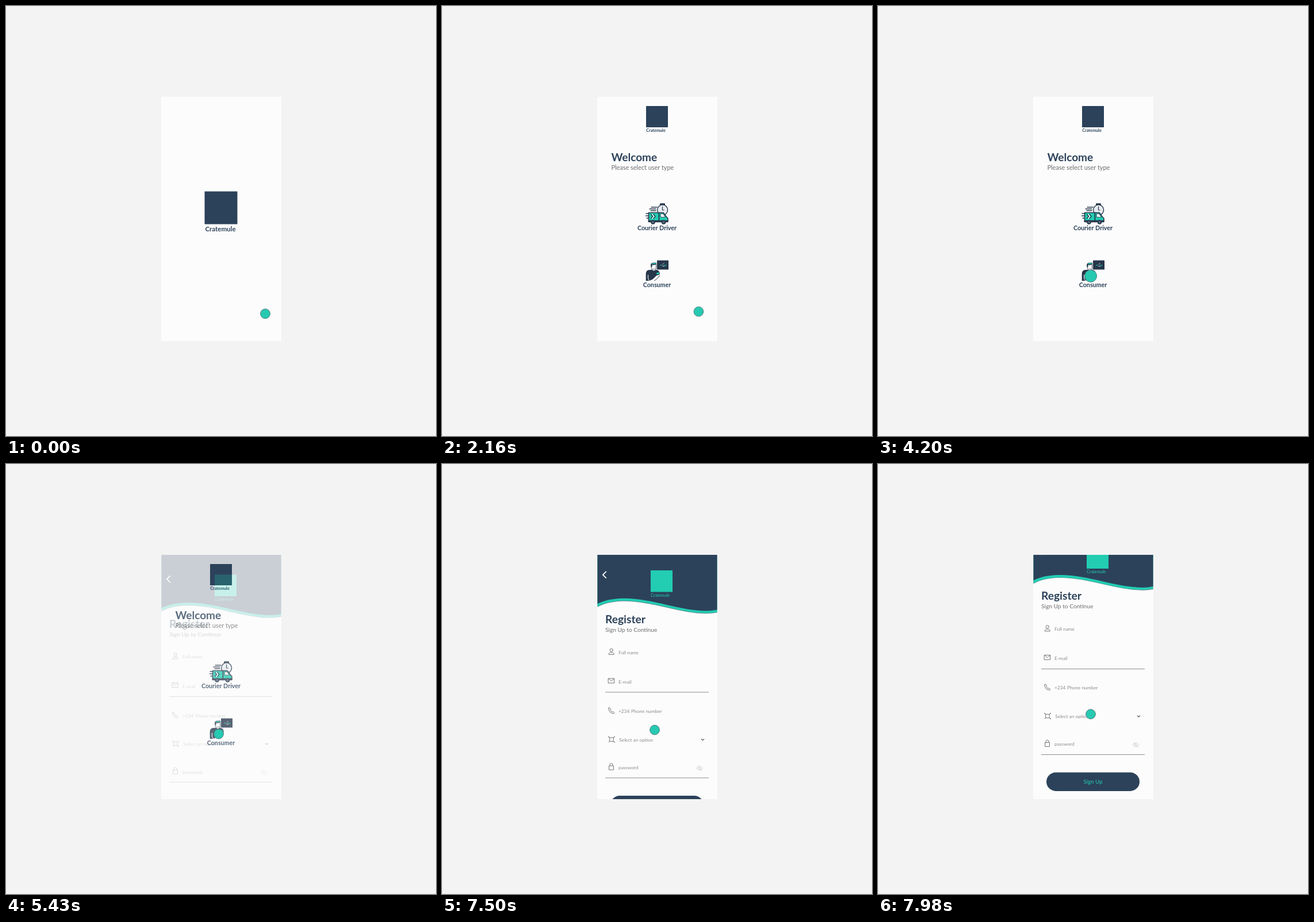
An HTML page with a canvas that plays this animation: 748 px wide and 748 px high, repeating every 8 s.

```html
<!DOCTYPE html>
<html lang="en">
<head>
<meta charset="utf-8">
<title>App sign-up flow</title>
<style>
  html, body { margin: 0; width: 100%; height: 100%; overflow: hidden; background: #f3f3f3; }
  canvas { display: block; }
</style>
</head>
<body>
<canvas id="stage" width="748" height="748"></canvas>
<script>
const SIZE = 748, LOOP = 8000;
const NAVY = '#2c425a', TEAL = '#22cdb2', PAPER = '#fcfcfc', GRAY = '#777', BRAND = 'Cratemule';
const INK = '#27364a';
const stage = document.getElementById('stage').getContext('2d');
const buffer = document.createElement('canvas');
buffer.width = buffer.height = SIZE;
const bufferCtx = buffer.getContext('2d');

const ease = x => x < 0.5 ? 2 * x * x : 1 - 2 * (1 - x) * (1 - x);
const tween = (t, start, end) => ease(Math.min(1, Math.max(0, (t - start) / (end - start))));
const mix = (a, b, p) => a + (b - a) * p;

function text(g, str, x, y, size, color, weight = 400, align = 'left') {
  g.font = `${weight} ${size}px Lato, sans-serif`;
  g.fillStyle = color;
  g.textAlign = align;
  g.fillText(str, x, y);
}

function rect(g, x, y, w, h, color, r = 0) {
  g.fillStyle = color;
  g.beginPath();
  g.roundRect(x, y, w, h, r);
  g.fill();
}

// Fill and/or stroke an SVG path.
function shape(g, d, fill, stroke, width = 1) {
  const path = new Path2D(d);
  if (fill) { g.fillStyle = fill; g.fill(path); }
  if (stroke) {
    g.strokeStyle = stroke;
    g.lineWidth = width;
    g.lineCap = g.lineJoin = 'round';
    g.stroke(path);
  }
}

function circle(g, x, y, r, fill, stroke, width = 1) {
  g.beginPath();
  g.arc(x, y, r, 0, Math.PI * 2);
  if (fill) { g.fillStyle = fill; g.fill(); }
  if (stroke) { g.strokeStyle = stroke; g.lineWidth = width; g.stroke(); }
}

function paper(g) {
  rect(g, 270, 158, 209, 425, PAPER);
}

function splash(g) {
  paper(g);
  rect(g, 345.5, 322.5, 57, 57, NAVY);
  text(g, BRAND, 373, 392, 11.5, NAVY, 700, 'center');
}

function courierIcon(g) {
  shape(g, 'M364 350H374M361 353H372M363 356H372M355 361H359M354.5 365H359M356 369H359', null, INK, 1.3);
  rect(g, 379, 343.3, 9, 3.2, INK, 1);
  circle(g, 383.6, 354.8, 9, '#e8ecf1', INK, 1.4);
  shape(g, 'M383.5 349V355H386', null, INK, 1.2);
  shape(g, 'M359.5 359.5H377.5V375.5H359.5Z', TEAL, INK, 1.6);
  shape(g, 'M377.5 359.5H385L391 367.5L392.8 369V375.5H377.5Z', TEAL, INK, 1.6);
  shape(g, 'M380.5 361.5H384.5L388.5 367.3H380.5Z', '#f5f7f8', INK, 0.8);
  shape(g, 'M365.8 362.5L368.8 366L365.8 369.5', null, '#f5f7f8', 1.8);
  shape(g, 'M363.5 362.5L366.5 366L363.5 369.5M368 362.5L371 366L368 369.5', null, INK, 1.3);
  shape(g, 'M359.5 374H392.5', null, INK, 2.4);
  for (const x of [367, 385.5]) circle(g, x, 376, 2.9, '#596b7d', INK, 1.7);
}

function consumerIcon(g) {
  rect(g, 374, 442.5, 20, 16, INK, 0.6);
  shape(g, 'M379.5 451.5L381 450L382.5 452M387 450V453M389.5 450.5V452', null, TEAL, 1);
  shape(g, 'M384 449.5L386 447.5M384 452.5H386', null, '#d9e1e7', 1);
  shape(g, 'M354.7 478V465Q355 459.5 361 459H373Q378.6 460 378.8 466L370 478Z', INK);
  shape(g, 'M364.3 449H372.6V456Q371.6 460.8 368.5 460.8T364.3 456Z', '#f7f7f7', INK, 0.9);
  shape(g, 'M363.3 454V449Q364.5 446.4 368 446.4H373V449.3Q369 451 365.4 450.8V454Z', INK);
  shape(g, 'M365.8 448.8Q368 447.3 372 448', null, TEAL, 1.4);
  shape(g, 'M367.2 457.4Q368.6 458.7 370.2 457.4', null, INK, 0.8);
  shape(g, 'M358.5 468V474Q359 476.5 361 477.5', null, '#f7f7f7', 1.1);
  shape(g, 'M361 478L367 475L373 469L379 467L377.5 471L370 478Z', '#f7f7f7');
  shape(g, 'M378.5 468.5Q376 474 369.5 477.6', null, INK, 0.9);
  shape(g, 'M372.5 464.5L377.5 462.5L378.5 466L374 467.5Z', TEAL, INK, 0.7);
}

function welcome(g) {
  paper(g);
  rect(g, 355, 174, 38, 37, NAVY);
  text(g, BRAND, 372, 219, 7.3, NAVY, 700, 'center');
  text(g, 'Welcome', 294.5, 269.5, 19, NAVY, 700);
  text(g, 'Please select user type', 294.5, 285, 10.9, '#6d6d70');
  courierIcon(g);
  text(g, 'Courier Driver', 374, 389.5, 10.7, NAVY, 700, 'center');
  consumerIcon(g);
  text(g, 'Consumer', 374, 488.5, 10.7, NAVY, 700, 'center');
}

function header(g) {
  const wave = (left, crest, dip, right) =>
    `M270.5 150V${left}C285 ${crest + 2.5} 300 ${crest} 318 ${crest}` +
    `C365 ${crest} 415 ${dip} 460 ${dip}Q470 ${dip} 478.5 ${right}V150Z`;
  shape(g, wave(256.3, 246.2, 267.8, 266), '#667e8b');
  shape(g, wave(255.5, 245.5, 267, 265.2), TEAL);
  shape(g, wave(250.5, 241.2, 263, 261), NAVY);
  shape(g, 'M285.3 194.8L279.8 200.2L285.3 205.6', null, '#f4f6f7', 1.8);
  rect(g, 363, 192.5, 38, 37.5, TEAL);
  text(g, BRAND, 379.5, 238, 7.3, TEAL, 400, 'center');
}

function fieldIcons(g) {
  circle(g, 294.6, 331.3, 2.6, null, GRAY);
  shape(g, 'M290 338.5Q290 335.3 294.6 335.3T299.2 338.5Z', null, GRAY);
  shape(g, 'M289.5 380.5H299.5V388.5H289.5ZM289.8 381L294.5 384.8L299.2 381', null, GRAY);
  shape(g, 'M289.7 432.2L291.5 431.2L293.6 434L292.7 435.5Q293.7 437.8 296 438.8L297.3 437.8L299.8 440L298.6 441.6Q290.2 441 289.7 432.2Z', null, GRAY);
  shape(g, 'M291.8 483.5H298.2V489.8H291.8ZM290 482L291.8 483.5M300 482L298.2 483.5M290 491.2L291.8 489.8M300 491.2L298.2 489.8', null, GRAY);
  for (const [x, y] of [[290, 482], [300, 482], [300, 491.2]]) circle(g, x, y, 0.9, GRAY);
  rect(g, 290, 532, 9, 8, GRAY, 1.2);
  rect(g, 291, 533, 7, 6, PAPER, 0.5);
  shape(g, 'M292 532V530.4Q292 528.3 294.5 528.3T297 530.4V532', null, GRAY);
  shape(g, 'M451.3 486L453.5 488.1L455.7 486', null, '#555', 1.2);
  shape(g, 'M443 536.7Q448.3 529 453.7 536.7Q448.3 544 443 536.7ZM444.5 533L452.5 540.5', null, '#cfcfcf', 0.9);
  circle(g, 448.3, 536.7, 1.7, null, '#cfcfcf', 0.9);
}

function register(g, scroll) {
  paper(g);
  g.save();
  g.beginPath();
  g.rect(270, 158, 209, 425);
  g.clip();
  g.translate(0, -scroll);
  header(g);
  text(g, 'Register', 284, 284.5, 19.2, NAVY, 700);
  text(g, 'Sign Up to Continue', 284, 299.5, 10.2, '#6d6d70');
  fieldIcons(g);
  const labels = [
    ['Full name', 307, 338], ['E-mail', 307, 389.5],
    ['+234', 307, 440.5], ['Phone number', 329, 440.5],
    ['Select an option', 308.3, 490], ['password', 307, 538.5]
  ];
  for (const [label, x, y] of labels) text(g, label, x, y, 8.3, '#8c8c8e');
  for (const y of [404, 553]) rect(g, 284, y, 180, 1, '#8d8f91');
  rect(g, 293, 584.5, 162, 32.5, NAVY, 16.25);
  text(g, 'Sign Up', 374, 604, 9.7, TEAL, 400, 'center');
  g.restore();
}

function dissolve(from, to, alpha) {
  from(stage);
  if (alpha <= 0) return;
  bufferCtx.clearRect(0, 0, SIZE, SIZE);
  to(bufferCtx, 0);
  stage.globalAlpha = alpha;
  stage.drawImage(buffer, 0, 0);
  stage.globalAlpha = 1;
}

function pointer(t) {
  const move = tween(t, 1975, 3075);
  const press = tween(t, 3740, 3940) - tween(t, 3940, 4500);
  const drag = 35 * tween(t, 7245, 8045);
  circle(stage, mix(451, 370, move), mix(535.3, 469.7, move) - drag,
    mix(8.4, 12.2, press), '#27c9b1', '#4d7478', 0.9);
}

function draw(t) {
  stage.fillStyle = '#f3f3f3';
  stage.fillRect(0, 0, SIZE, SIZE);
  if (t < 1940) dissolve(splash, welcome, tween(t, 670, 1940));
  else if (t < 6140) dissolve(welcome, register, tween(t, 5060, 6140));
  else register(stage, 55 * tween(t, 7245, 8225));
  pointer(t);
}

let start;
function tick(now) {
  start ??= now;
  draw((now - start) % LOOP);
  requestAnimationFrame(tick);
}
draw(0);
requestAnimationFrame(tick);
</script>
</body>
</html>
```
